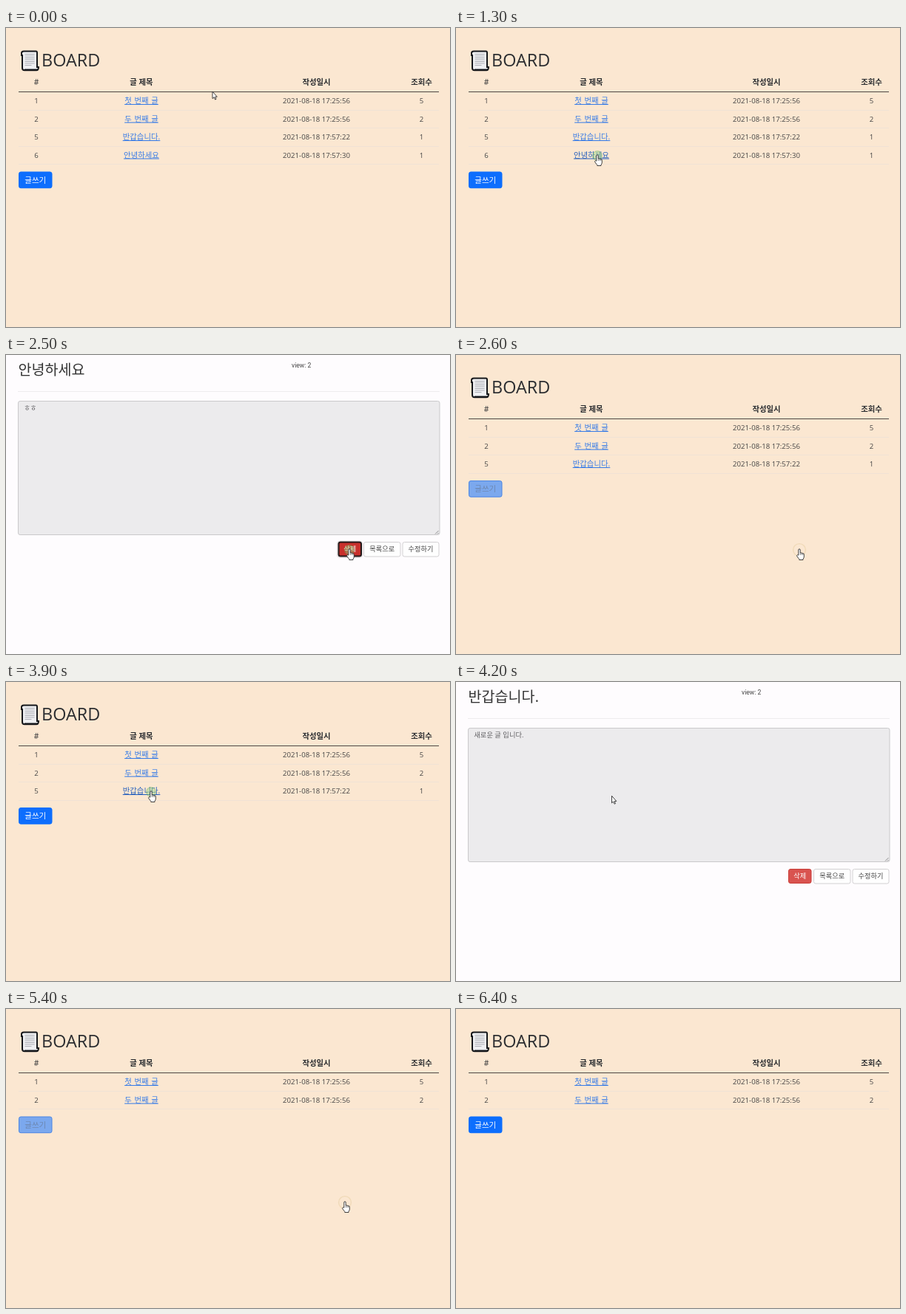
Write an HTML page that moves like this. It is 600 px wide and 405 px high and loops after 6.5 s.

```html
<!DOCTYPE html>
<html lang="ko">
<head>
<meta charset="utf-8">
<title>Board</title>
<style>
  html, body { margin: 0; width: 100%; height: 100%; overflow: hidden; background: #fbe7d1; }
  svg { display: block; width: 600px; height: 405px; }
  text { font-family: "Open Sans", "Noto Sans CJK KR", sans-serif; white-space: pre; }
  .mid { text-anchor: middle; }
  .link { text-decoration: underline; word-spacing: 1px; }
  .view { font-family: Roboto, sans-serif; }
</style>
</head>
<body>
<svg id="stage" viewBox="0 0 600 405"></svg>
<script>
const LOOP = 6500, STEP = 100, LOAD = 200;
const ROW_H = 24.5;
const stage = document.getElementById('stage');

const HEADS = ['#', '글 제목', '작성일시', '조회수'];
const COLS = [41, 183, 419.5, 561.5];
const ROWS = [
  ['1', '첫 번째 글', '2021-08-18 17:25:56', '5'],
  ['2', '두 번째 글', '2021-08-18 17:25:56', '2'],
  ['5', '반갑습니다.', '2021-08-18 17:57:22', '1'],
  ['6', '안녕하세요', '2021-08-18 17:57:30', '1']
];
const BODIES = { '5': '새로운 글 입니다.', '6': 'ㅎㅎ' };

// One pointer move per page; its click loads the next page.
const HOME = { x: 279, y: 86 };
const MOVES = [
  { from: 100, to: 700, x: 191, y: 172, click: 1200 },
  { from: 1400, to: 1800, x: 464, y: 263, click: 2400 },
  { from: 3000, to: 3700, x: 196, y: 148, click: 3800 },
  { from: 4100, to: 4800, x: 458, y: 261, click: 5200 },
  { from: 5500, to: 6400, x: 519, y: 12, click: LOOP }
];

const clamp = v => Math.min(1, Math.max(0, v));
const ease = v => v * v * (3 - 2 * v);
const mix = (a, b, k) => a + (b - a) * k;

function text(x, y, str, size, fill = '#444', extra = '') {
  return `<text x="${x}" y="${y}" font-size="${size}" fill="${fill}" ${extra}>${str}</text>`;
}
function box(x, y, w, h, fill, extra = '') {
  return `<rect x="${x}" y="${y}" width="${w}" height="${h}" fill="${fill}" ${extra}/>`;
}
function path(d, fill, extra = '') {
  return `<path d="${d}" fill="${fill}" ${extra}/>`;
}
function rule(x, y, w, fill) {
  return box(x, Math.round(y), w, 1, fill);
}

function scrollIcon() {
  let s = path('M21 37V34Q21 31.5 24 31.5H40.5Q42 31.5 42 33.5V53H44Q44 57.3 41 57.3H25Q22 57.3 22 54V37Z',
    '#eff0f2', 'stroke="#15171a" stroke-width="2"');
  s += path('M25 55.5H43V58H25Z', '#15171a');
  for (let i = 0; i < 7; i++) s += box(25.5, 35 + i * 2.5, i < 6 ? 13 : 9, 0.9, '#a6a9ae');
  return s;
}

function listPage(count, hover, fresh) {
  let s = box(0, 0, 600, 405, '#fbe7d1') + scrollIcon();
  s += text(48, 52.3, 'BOARD', 23.4, '#2b2d30');
  HEADS.forEach((h, i) => {
    s += text(COLS[i], 77, h, 10.4, '#2b2d30', `class="mid" font-weight="${i ? 700 : 500}"`);
  });
  s += rule(17, 86, 568, '#4a4743');
  ROWS.slice(0, count).forEach((row, r) => {
    row.forEach((cell, c) => {
      const link = c === 1;
      const fill = !link ? '#444' : hover && r === count - 1 ? '#2861bd' : '#397ce6';
      s += text(COLS[c], 102 + r * ROW_H, cell, link ? 10.4 : 9.65, fill, `class="mid${link ? ' link' : ''}"`);
    });
    s += rule(17, 110.5 + r * ROW_H, 568, '#f0e2d5');
  });
  const top = 96.5 + count * ROW_H;
  s += box(17.5, top + 0.5, 44.5, 21.7, fresh ? '#7ba8ee' : '#0d6efd',
    `rx="2.5" stroke="${fresh ? '#4a86e4' : '#0d6efd'}"`);
  return s + text(39.8, top + 15, '글쓰기', 10.5, fresh ? '#6d87b0' : '#fff', 'class="mid"');
}

function button(x, w, label) {
  return box(x, 253.5, w, 19.5, '#fefefe', 'rx="2.5" stroke="#d2d0d2"') +
    text(x + w / 2, 266.2, label, 9.2, '#444', 'class="mid"');
}

function detailPage([id, title], heat, focus) {
  let s = box(0, 0, 600, 405, '#fefcfe');
  s += text(16.5, 27, title, 19.6, '#333');
  s += text(386, 16.6, 'view: 2', 8.6, '#444', 'class="view"');
  s += rule(16, 49, 570, '#eeecee');
  s += box(16.5, 62.5, 569.5, 181, '#ecebed', 'rx="2.5" stroke="#cac9cb"');
  s += text(24.3, 75.3, BODIES[id], 9.3, '#626164');
  s += path('M580 242.5L584.5 238M583 242.5L584.5 241', 'none', 'stroke="#777" stroke-width=".8"');
  const red = `rgb(${mix(217, 201, heat)} ${mix(83, 48, heat)} ${mix(79, 44, heat)})`;
  if (focus) s += box(447.5, 252, 34, 22.5, 'none', 'rx="3.5" stroke="#e2dedf"');
  s += box(449.5, 253.5, 30.5, 19, red,
    `rx="2.5" stroke="${focus ? '#25191a' : '#c93d38'}" stroke-width="${focus ? 2 : 1}"`);
  s += text(464.7, 266.2, '삭제', 9.2, '#fff', 'class="mid" font-weight="500"');
  return s + button(483.5, 49.5, '목록으로') + button(536, 49, '수정하기');
}

// A green spot while pressed, then a widening pale ring.
function ripple(t, x, y) {
  const hit = MOVES.find(m => t >= m.click && t < m.click + 2 * LOAD);
  if (!hit) return '';
  const age = (t - hit.click) / STEP, down = age < 2;
  return `<circle cx="${x}" cy="${y + 1}" r="${4 + age * 2.2}" fill="${down ? '#9ad484' : 'none'}"
    stroke="${down ? '#6db45c' : '#dcc48a'}" stroke-width="1.4" opacity="${0.55 - age * 0.1}"/>`;
}

function pointer(x, y, hand) {
  const pen = 'stroke="#222" stroke-width=".85" stroke-linejoin="round"';
  const shape = hand
    ? path('M-1.2 8.2V1Q-1.2-.2 0-.2Q1.2-.2 1.2 1V5Q2.2 4.5 3 5.4Q4 4.9 4.8 5.8Q6.3 5.5 6.3 7.2V10Q6.3 12 5 13.2V14.5H-.2V13.5L-3.2 9.7Q-3.8 8.4-2.7 7.8Q-1.9 7.5-1.2 8.2Z', '#fff', pen) +
      path('M1.2 5V8M3 5.4V8M4.8 5.8V8.2', 'none', 'stroke="#444" stroke-width=".6"')
    : path('M0 0V9.6L2.1 7.7L3.6 11L5 10.3L3.6 7.2H6.3Z', '#fff', pen);
  return `<g transform="translate(${x} ${y})">${shape}</g>`;
}

function scene(t) {
  const n = MOVES.filter(m => t >= m.click + LOAD).length;
  const move = MOVES[n], prev = MOVES[n - 1] || HOME;
  const k = ease(clamp((t - move.from) / (move.to - move.from)));
  const x = mix(prev.x, move.x, k), y = mix(prev.y, move.y, k);

  const fresh = n > 0 && t < prev.click + LOAD + STEP;
  const last = n === MOVES.length - 1;
  const over = !last && t >= move.to;
  const count = ROWS.length - Math.floor(n / 2);
  const page = n % 2
    ? detailPage(ROWS[count - 1], clamp((t - move.to) / (2 * STEP)), t >= move.click)
    : listPage(count, over, fresh);
  const gone = last && t >= move.to;
  return page + ripple(t, x, y) + (gone ? '' : pointer(x, y, over || fresh));
}

let shown = -1;
function draw() {
  const t = Math.floor(performance.now() % LOOP / STEP) * STEP;
  if (t !== shown) {
    shown = t;
    stage.innerHTML = scene(t);
  }
  requestAnimationFrame(draw);
}
draw();
</script>
</body>
</html>
```
